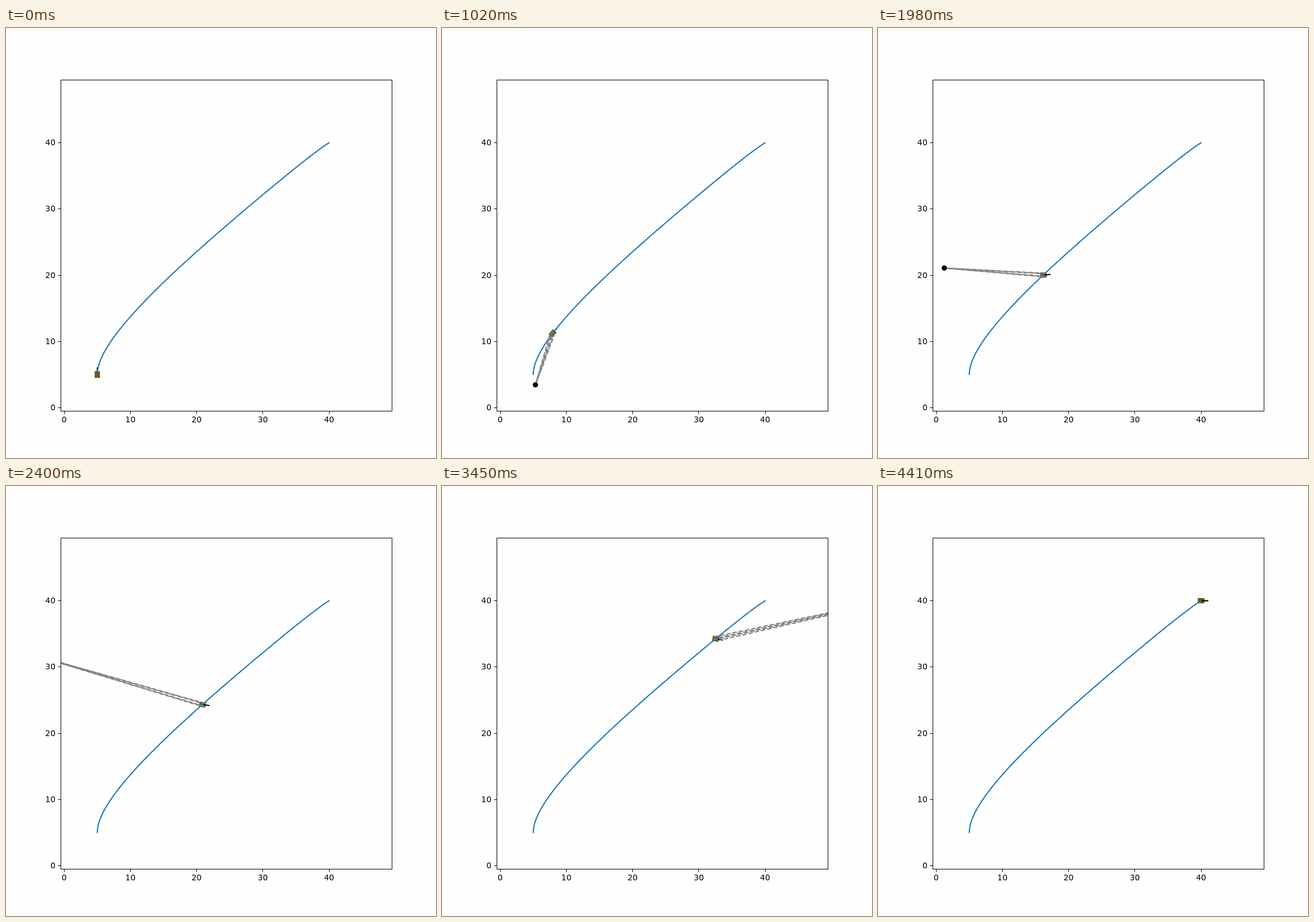
These frames come from a looping animation (748x748 px, 4.44 s). An HTML page with a canvas:

```html
<!DOCTYPE html>
<html lang="en">
<head>
<meta charset="utf-8">
<style>
html, body { margin: 0; width: 100%; height: 100%; overflow: hidden; background: #fefefe; }
canvas { display: block; }
</style>
</head>
<body>
<canvas id="plot" width="748" height="748"></canvas>
<script>
const ctx = document.getElementById('plot').getContext('2d');
const SCALE = 11.52, STEP = 30, STEPS = 148, LINE = 2.08;
const BOX = { x: 95.5, y: 90.5, size: 576 };
const { PI, sin, cos, atan2 } = Math;

const px = x => 101.2 + x * SCALE;
const py = y => 660.4 - y * SCALE;
const poly = (u, ...c) => c.reduceRight((sum, k) => sum * u + k, 0);

// Quintic position and heading profiles, u runs from 0 to 1
const posX = u => 5 + 35 * u * u * poly(u, 1.215, 2.319, -3.977, 1.443);
const posY = u => 5 + 35 * u * poly(u, 0.5217, 1.0272, 0.4377, -1.4866, 0.5);
const heading = u => PI / 2 * (1 - u) ** 2 * poly(u, 1, 2, -9.5, 1.8);
const turnRate = u => (heading(u + 1e-4) - heading(u - 1e-4)) / 2e-4;
const steer = u => -2.2 * PI * u * (1 - u);
const speed = u => 20 + 23 * sin(PI * u);

function stroke(points, color, width = LINE, cap = 'square', close = false) {
  ctx.beginPath();
  points.forEach(([x, y]) => ctx.lineTo(px(x), py(y)));
  if (close) ctx.closePath();
  ctx.strokeStyle = color;
  ctx.lineWidth = width;
  ctx.lineCap = cap;
  ctx.stroke();
}

const route = Array.from({ length: STEPS }, (_, i) => i / (STEPS - 1)).map(u => [posX(u), posY(u)]);

function drawAxes() {
  const bottom = BOX.y + BOX.size;
  ctx.strokeStyle = ctx.fillStyle = '#000';
  ctx.lineWidth = 1;
  ctx.lineCap = 'butt';
  ctx.strokeRect(BOX.x, BOX.y, BOX.size, BOX.size);
  ctx.font = '13.89px "DejaVu Sans", sans-serif';
  ctx.beginPath();
  for (let v = 0; v <= 40; v += 10) {
    const x = Math.floor(px(v)) + 0.5, y = Math.floor(py(v)) + 0.5;
    ctx.moveTo(x, bottom);
    ctx.lineTo(x, bottom + 5);
    ctx.moveTo(BOX.x, y);
    ctx.lineTo(BOX.x - 5, y);
    ctx.textAlign = 'center';
    ctx.fillText(v, px(v), 686);
    ctx.textAlign = 'right';
    ctx.fillText(v, 86, Math.round(y) + 4);
  }
  ctx.stroke();
}

function drawScene(step) {
  const u = step / (STEPS - 1);
  const x = posX(u), y = posY(u), turn = heading(u);
  const moving = step > 0 && step < STEPS - 1;
  const c = cos(turn), s = sin(turn);

  const place = (f, l) => [x + f * c - l * s, y + f * s + l * c];
  const corners = (f, l) => [place(f, l), place(f, -l), place(-f, -l), place(-f, l)];
  const wheels = corners(0.33, 0.23);

  const side = turn - PI / 2 + steer(u);
  const radius = -speed(u) / turnRate(u);
  const center = [x + radius * cos(side), y + radius * sin(side)];

  ctx.fillStyle = '#fefefe';
  ctx.fillRect(0, 0, 748, 748);
  ctx.save();
  ctx.beginPath();
  ctx.rect(BOX.x, BOX.y, BOX.size, BOX.size);
  ctx.clip();

  stroke(corners(0.4, 0.3), 'green', LINE, 'butt', true);
  ctx.fillStyle = '#7d5a22';
  ctx.fill();
  wheels.forEach(([wx, wy]) => {
    const roll = moving ? atan2(wy - center[1], wx - center[0]) + PI / 2 : turn;
    const dx = 0.15 * cos(roll), dy = 0.15 * sin(roll);
    stroke([[wx - dx, wy - dy], [wx + dx, wy + dy]], 'red', 1.4, 'butt');
  });
  stroke([[x, y], [x + c, y + s]], '#000');
  stroke(route, '#1f77b4');

  if (moving) {
    ctx.setLineDash([3.7 * LINE, 1.6 * LINE]);
    wheels.forEach(w => stroke([w, center], 'gray', LINE, 'butt'));
    ctx.setLineDash([]);
    ctx.beginPath();
    ctx.arc(px(center[0]), py(center[1]), 4.6, 0, 2 * PI);
    ctx.fillStyle = '#000';
    ctx.fill();
  }
  ctx.restore();
  drawAxes();
}

const start = performance.now();
function tick() {
  const time = Math.max(0, performance.now() - start);
  drawScene(Math.floor(time / STEP) % STEPS);
  requestAnimationFrame(tick);
}
tick();
</script>
</body>
</html>
```
